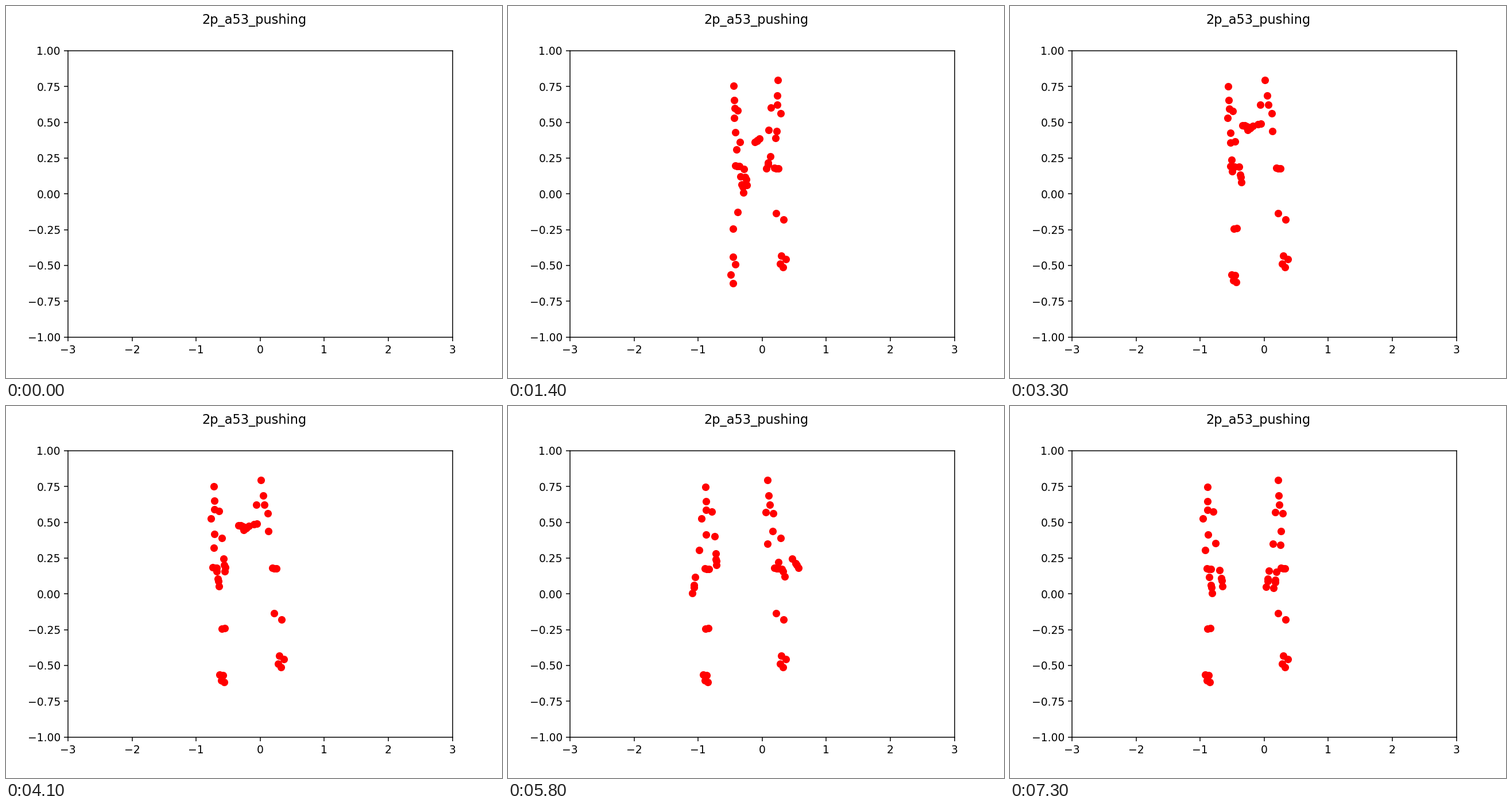
Write a matplotlib script that moves like this. It is 864 px wide and 648 px high and loops after 7400 ms.

```python
import numpy as np
import matplotlib.pyplot as plt
from matplotlib.animation import FuncAnimation

FRAMES, STEP = 74, 100

# Arm poses: upper arm, forearm and hand vectors in stage pixels, y down
HANG = np.array([(4, 55), (7, 47), (5, 28)], float)
FOLD = np.array([(5, 43), (2, 30), (1, 20)], float)
REACH_NEAR = np.array([(-4, 34), (-19, 4), (-8, -2)], float)
REACH_FAR = np.array([(-19, 18), (-14, 4), (-9, 7)], float)
SWING_NEAR = np.array([(3, 55), (19, 32), (11, 25)], float)
SWING_FAR = np.array([(17, 47), (25, 40), (13, 17)], float)
MIRROR = np.array([-1, 1])

# Knees, ankles and feet, near and far leg in turn, x from the stance centre
PUSHER_LEGS = np.array([(-9, 360), (4, 371), (0, 434), (8, 440),
                        (-2, 448), (3, 454)], float)
LOOSE_LEGS = np.array([(10, 358), (2, 387), (6, 449), (2, 436),
                       (2, 482), (-2, 467)], float)
FIRM_LEGS = np.array([(5, 386), (0, 387), (2, 468), (-4, 467),
                      (4, 480), (-1, 477)], float)


def smooth(frame, start, end):
    u = np.clip((frame - start) / (end - start), 0, 1)
    return u * u * (3 - 2 * u)


def ease_out(frame, start, end):
    u = np.clip((frame - start) / (end - start), 0, 1)
    return 1 - (1 - u) ** 2


def mix(a, b, u):
    return np.asarray(a) * (1 - u) + np.asarray(b) * u


def sequence(frame, *keys):
    """Pass smoothly through (time, pose) keys."""
    start, pose = keys[0]
    for end, following in keys[1:]:
        pose = mix(pose, following, smooth(frame, start, end))
        start = end
    return pose


def arm(shoulder, pose):
    upper, fore, hand = pose
    elbow = shoulder + upper
    wrist = elbow + fore
    thumb = wrist + 0.65 * hand + (1, 0)
    return [shoulder, elbow, wrist, wrist + 0.5 * hand, thumb, wrist + hand]


def body(head, base, shoulders, arms, legs, centre):
    spine = base - head
    trunk = [head + k * spine for k in (0, 0.177, 0.28, 0.58, 1)]
    hips = [base - (3.5, 0.5), base + (3.5, 0.5)]
    limbs = [p for s, a in zip(shoulders, arms) for p in arm(trunk[2] + s, a)]
    return [*trunk, *hips, *limbs, *(legs + (centre, 0))]


def pushed(frame):
    recoil = ease_out(frame, 28, 62)
    head = mix((393, 138.5), (343.5, 140.5), recoil)
    base = mix((399, 278), (346, 283), ease_out(frame, 30, 56))
    shoulders = mix([(5, 4), (-1, 17)], [(10, 3), (-8, 15)], recoil)
    near = sequence(frame, (28, HANG), (49, FOLD), (58, FOLD), (73, HANG))
    far = sequence(frame, (24, HANG), (33, FOLD), (46, HANG),
                   (59, HANG * MIRROR), (72, HANG))
    legs = mix(LOOSE_LEGS, FIRM_LEGS, smooth(frame, 22, 33))
    centre = 390 - 46 * smooth(frame, 33, 55)
    return body(head, base, shoulders, (near, far), legs, centre)


def pusher(frame):
    lean = smooth(frame, 14, 33) * (1 - smooth(frame, 45, 80))
    reach = smooth(frame, 6, 20) * (1 - smooth(frame, 47, 58))
    head = np.array([469.5 - 26 * lean, 128])
    base = np.array([467 + 9 * smooth(frame, 55, 75), 282])
    shoulders = np.array([mix((-7, 13), (-14, 0), reach), (6, 15)])
    rest = HANG * MIRROR
    near = sequence(frame, (6, rest), (18, REACH_NEAR), (42, REACH_NEAR),
                    (58, SWING_NEAR), (72, rest))
    far = sequence(frame, (9, rest), (22, REACH_FAR), (43, REACH_FAR),
                   (62, SWING_FAR), (72, rest))
    return body(head, base, shoulders, (near, far), PUSHER_LEGS, 476)


fig, ax = plt.subplots(figsize=(6.4, 4.8), dpi=135)
fig.suptitle("2p_a53_pushing")
ax.set_xlim(-3, 3)
ax.set_ylim(-1, 1)
dots, = ax.plot([], [], "ro")


def draw(frame):
    if frame == 0:
        dots.set_data([], [])
    else:
        x, y = np.array(pushed(frame) + pusher(frame)).T
        dots.set_data((x - 442.8) / 111.6, (326.6 - y) / 249.48)
    return dots,


anim = FuncAnimation(fig, draw, frames=FRAMES, interval=STEP,
                     init_func=lambda: draw(0), repeat=True, repeat_delay=0)
plt.show()
```
